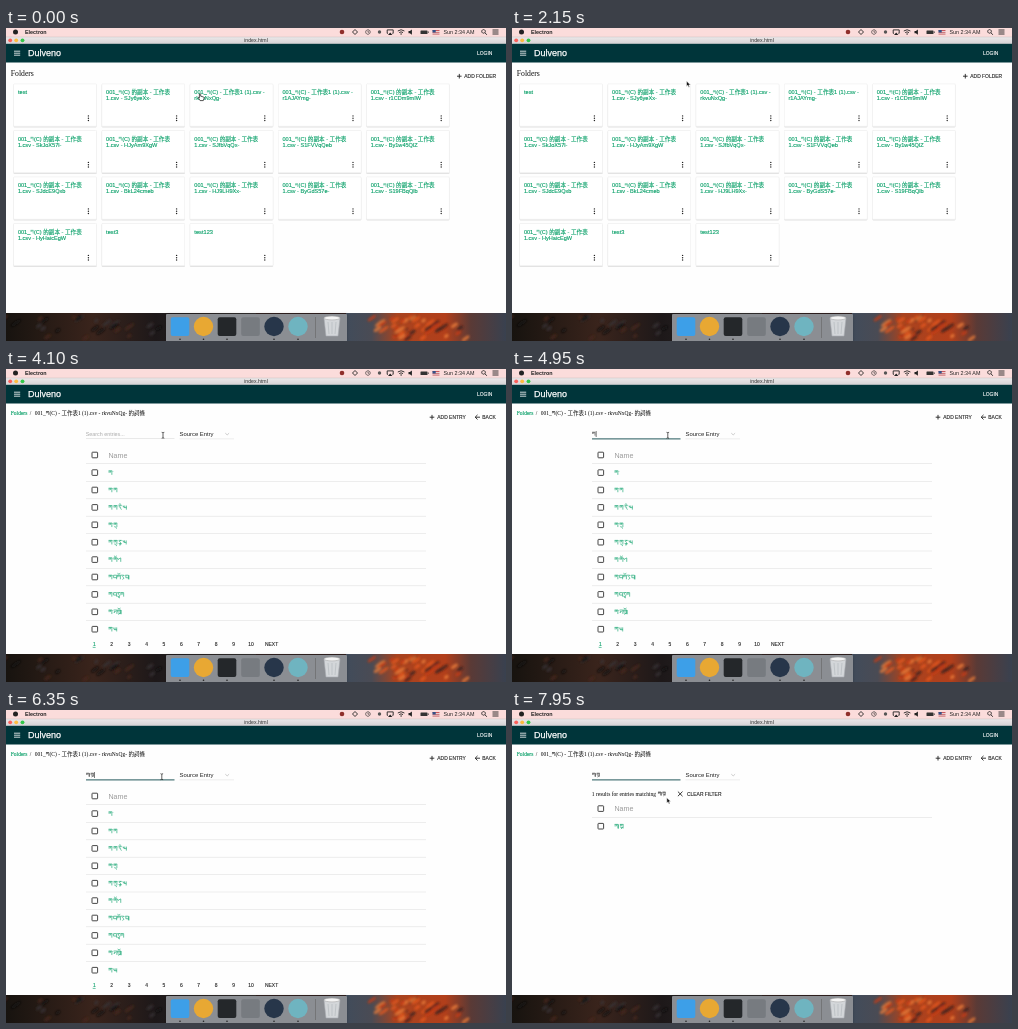
Write an HTML page that moves like this. It is 500 by 313 pixels and loops after 8 s.

```html
<!DOCTYPE html>
<html lang="en">
<head>
<meta charset="utf-8">
<title>Folders</title>
<style>
  html, body { margin: 0; width: 100%; height: 100%; overflow: hidden; }
  svg { display: block; width: 100vw; height: 100vh; }
  text { font-family: "Liberation Sans", "Noto Sans CJK SC", "Noto Sans CJK", sans-serif; white-space: pre; }
  .serif { font-family: "Liberation Serif", "Noto Sans CJK SC", "Noto Sans CJK", serif; }
  .button { font-size: 4.95px; fill: #222; stroke: #222; stroke-width: .12; }
  .green { color: #0aa069; }
  .green text, text.green { fill: currentColor; stroke: currentColor; stroke-width: .14; }
  .hover { color: #15302f; }
  .hover text { text-decoration: underline; }
  .line { fill: none; stroke: #222; stroke-width: .9; }
</style>
</head>
<body>
<svg id="stage" viewBox="0 0 500 313" preserveAspectRatio="none">
  <defs>
    <linearGradient id="leftSlope">
      <stop offset="0" stop-color="#17130f"/><stop offset=".35" stop-color="#3a241c"/>
      <stop offset=".6" stop-color="#1d1819"/><stop offset="1" stop-color="#33302f"/>
    </linearGradient>
    <linearGradient id="rightSlope">
      <stop offset="0" stop-color="#414c5b"/><stop offset=".16" stop-color="#4a4b54"/>
      <stop offset=".32" stop-color="#a8431f"/><stop offset=".62" stop-color="#b23f1b"/>
      <stop offset=".78" stop-color="#5a3a36"/><stop offset="1" stop-color="#39414f"/>
    </linearGradient>
    <linearGradient id="bar" x2="0" y2="1">
      <stop offset="0" stop-color="#ebe8e9"/><stop offset="1" stop-color="#d5d2d4"/>
    </linearGradient>
    <filter id="soft" x="-20%" y="-20%" width="140%" height="140%"><feGaussianBlur stdDeviation=".8"/></filter>
    <filter id="shadow" x="-5%" y="-10%" width="110%" height="125%">
      <feDropShadow dx="0" dy=".5" stdDeviation=".6" flood-opacity=".25"/>
    </filter>
    <filter id="dockShadow" x="-5%" y="-30%" width="110%" height="160%">
      <feDropShadow dx="0" dy="0" stdDeviation="1.5" flood-opacity=".2"/>
    </filter>
  </defs>
  <g id="desktop"></g>
  <g id="chrome"></g>
  <g id="folders"></g>
  <g id="entries"></g>
  <g id="cursor"></g>
</svg>
<script>
const byId = id => document.getElementById(id);
const range = n => [...Array(n).keys()];
const rect = (x, y, w, h, fill, extra = '') =>
  `<rect x="${x}" y="${y}" width="${w}" height="${h}" fill="${fill}" ${extra}/>`;
const dot = (x, y, r, fill) => `<circle cx="${x}" cy="${y}" r="${r}" fill="${fill}"/>`;
const line = (d, extra = '') => `<path class="line" d="${d}" ${extra}/>`;
const text = (x, y, size, content, extra = '') =>
  `<text x="${x}" y="${y}" font-size="${size}" ${extra}>${content}</text>`;
const button = (x, y, label, extra = '') => `<text class="button" x="${x}" y="${y}" ${extra}>${label}</text>`;
const plus = x => line(`M${x - 2.3} 48.2h4.6m-2.3 -2.3v4.6`);

// Strokes of the Tibetan letters: [path, advance]. Vowel signs attach to the letter before.
const letters = {
  k: ['M0 0H4M.6 0V2.4M2.1 0V2.1M3.7 0V4.6', 4.4],
  '.': ['M0 .2l.5 .6', 1.3],
  n: ['M0 0H3.4M.4 1.9Q2 .4 2.1 2T3.2 4.6', 4],
  y: ['M0 0Q0 2.6 1.6 2.3V0M1.6 2.3H3.5M3.5 0V4.6', 4.1],
  b: ['M0 0V2.8H3.4M0 0H3.4V4.6', 4],
  l: ['M0 .2Q.6 3 1.9 1.3T3.7 .2V4.6', 4.3],
  d: ['M0 0H3Q.8 1.2 2.6 2.4T1.6 4.8', 3.6],
  m: ['M0 0H3.5V4.6M.6 0V2.8L3.5 3', 4.1],
  t: ['M0 0H3.4M2.6 0Q-.3 1.4 2 2.3T1.6 5.8', 3.8],
  g: ['M0 0H3.6V4.6M.5 0V2.8M1.9 0V2.4', 4.2],
  s: ['M0 0H3.7V4.4M.4 3Q.6 1 2 1.5L.8 3.2', 4.2],
  h: ['M0 .2Q.2 3 1.6 2.8L3.5 2.4M1.7 0V2.8M3.5 0V4.6', 4.1],
  '|': ['M0 0V4.8', 1.6],
  i: ['M-4 -1q1.5 -2.2 3 0', 0],
  o: ['M-4 -2.2l1.6 1 1.6 -1', 0],
  u: ['M-3.6 4.3q1.2 -1 1.6 .5t1.4 1.2', 0],
  r: ['M-3.8 3.5h2.6l-2 1.7', 0]
};
const tibetanWidth = (word, scale) => [...word].reduce((sum, c) => sum + letters[c][1] * scale, 0);
function tibetan(word, x, top, scale, color = 'currentColor') {
  let pen = 0;
  const paths = [...word].map(c => {
    const [d, advance] = letters[c], path = `<path d="${d}" transform="translate(${pen})"/>`;
    pen += advance;
    return path;
  });
  return `<g transform="translate(${x} ${top}) scale(${scale})" fill="none" stroke="${color}" stroke-width=".7">${paths.join('')}</g>`;
}

const dockIcons = [['square', 174, '#3d9fe8'], ['circle', 197.5, '#e8a833'], ['square', 221, '#24272a'],
  ['square', 244.5, '#777b80'], ['circle', 268, '#27364a'], ['circle', 292, '#6fb4c0']];

const noise = n => Math.abs(Math.sin(n * 127.1) * 43758.5) % 1;
const patches = (count, x, width, colors) => range(count).map(i =>
  `<ellipse cx="${x + width * noise(i + 1)}" cy="${286 + 27 * noise(i + 50)}" rx="${2 + 5 * noise(i + 90)}" ry="1.8" transform="rotate(-35 ${x + width * noise(i + 1)} 299)" fill="${colors[i % colors.length]}" opacity=".7"/>`).join('');

byId('desktop').innerHTML =
  rect(0, 280, 250, 33, 'url(#leftSlope)') + rect(250, 280, 90, 33, '#30201f') + rect(340, 280, 160, 33, 'url(#rightSlope)') +
  `<g filter="url(#soft)">${patches(24, 0, 155, ['#0d0c0c', '#4a2a1e', '#393536'])}` +
  `${patches(40, 370, 85, ['#e8581c', '#35201d', '#c93a14', '#f0803a'])}</g>`;

byId('chrome').innerHTML =
  rect(0, 0, 500, 9, '#fbdcdb') + dot(9.5, 4, 2.5, '#222') +
  text(19, 6.2, 5.4, 'Electron', 'font-weight="700" fill="#222"') +
  dot(336, 4, 2.3, '#8f2f2b') + line('M349 1.5l2.5 2.5 -2.5 2.5 -2.5 -2.5z') +
  line('M362 1.7a2.3 2.3 0 1 1 -.1 0M362 2.5v1.7h1.2', 'style="stroke-width:.6"') + dot(373.5, 4, 1.7, '#555') +
  line('M382 5.3h-.8v-3.4h6v3.4h-.8') + '<path d="M382 7l2.2 -2.5 2.2 2.5z" fill="#222"/>' +
  line('M391.8 3q3.3 -2.5 6.6 0M393.2 4.6q1.9 -1.5 3.8 0') + dot(395.1, 6, .7, '#222') +
  '<path d="M402.5 3h1.4l2 -1.6v5.4l-2 -1.6h-1.4z" fill="#222"/>' +
  rect(414.5, 2.4, 7, 3.6, '#333', 'rx=".5"') + rect(421.9, 3.4, .7, 1.6, '#333') +
  rect(426.5, 2, 7, 4.6, '#f2f2f2') + range(3).map(i => rect(426.5, 2 + i * 1.8, 7, .9, '#c4464c')).join('') + rect(426.5, 2, 3.2, 2.5, '#345187') +
  text(437.5, 6.2, 5.4, 'Sun 2:34 AM', 'fill="#222"') +
  line('M477.6 1.6a1.8 1.8 0 1 1 -.1 0M479 4.8l1.8 2') + line('M486.5 2h6m-6 2h6m-6 2h6') +
  rect(0, 9, 500, 7, 'url(#bar)') + rect(0, 8.8, 500, .4, '#bbb') +
  dot(4.2, 12.3, 1.9, '#fc605b') + dot(10.2, 12.3, 1.9, '#fdbc40') + dot(16.5, 12.3, 1.9, '#34c84a') +
  text(250, 14.2, 5.2, 'index.html', 'text-anchor="middle" fill="#333"') +
  rect(0, 16, 500, 269, '#fefefe') + rect(0, 15.8, 500, 18.7, '#00353a') +
  line('M8 23.2h6.2m-6.2 2h6.2m-6.2 2h6.2', 'style="stroke:#fff;stroke-width:.8"') +
  text(22, 28.2, 9, 'Dulveno', 'fill="#fff" stroke="#fff" stroke-width=".25"') +
  button(471, 27.1, 'LOGIN', 'style="fill:#fff;stroke:#fff"') +
  rect(160, 286, 181, 30, '#8b8e93', 'rx="1" filter="url(#dockShadow)"') +
  dockIcons.map(([shape, x, fill]) => shape === 'circle' ? dot(x, 298.5, 9.7, fill) : rect(x - 9.3, 289.3, 18.6, 18.6, fill, 'rx="2"')).join('') +
  [174, 197.5, 221, 268, 292].map(x => dot(x, 311.3, .8, '#222')).join('') +
  rect(309.3, 289, .6, 21, '#666') +
  '<path d="M318 290h16l-2 18h-12z" fill="#d3d6d9" stroke="#a9aeb3" stroke-width=".6"/>' +
  '<ellipse cx="326" cy="290" rx="8" ry="1.9" fill="#f4f4f4" stroke="#aaa" stroke-width=".6"/>' +
  line('M322 294l1 12m3 -12v12m4 -12l-1 12', 'style="stroke:#b5babf;stroke-width:.7"');

const copy = id => ['(C) 的副本 - 工作表', '1.csv - ' + id];
const sheet = id => ['(C) - 工作表1 (1).csv -', id];
const cards = ['test', copy('SJy6yeXx-'), sheet('rkvuNxQg-'), sheet('r1AJAYmg-'), copy('r1CDm9mIW'),
  ...['SkJoX57l-', 'HJyAm9XgW', 'SJfbVqQx-', 'S1FVVqQeb', 'By1w45QlZ',
    'SJdcE9Qxb', 'BkL24cmeb', 'HJ9LH9Xx-', 'ByGdS57e-', 'S19FBqQlb', 'HyHaicEgW'].map(copy),
  'test3', 'test123'];

function card(label, i) {
  const x = 7.6 + i % 5 * 88.2, y = 56 + Math.floor(i / 5) * 46.5;
  const words = typeof label === 'string'
    ? text(x + 4.3, y + 10.3, 5.7, label)
    : text(x + 4.3, y + 10.3, 5.6, `001_<tspan dx="3.6">${label[0]}</tspan>`) +
      tibetan('k', x + 17, y + 6.8, .7) + text(x + 4.3, y + 16, 5.6, label[1]);
  return rect(x, y, 83, 42.2, '#fff', 'rx=".8" stroke="#ebebeb" stroke-width=".4" filter="url(#shadow)"') +
    `<g class="green" id="card${i}">${words}</g>` +
    [-2.3, 0, 2.3].map(dy => dot(x + 74.8, y + 34.2 + dy, .7, '#222')).join('');
}
byId('folders').innerHTML =
  text(4.8, 48.2, 7.7, 'Folders', 'class="serif" fill="#111"') + plus(453.3) + button(458.3, 50, 'ADD FOLDER') +
  cards.map(card).join('');

const checkbox = y => rect(86, y - 2.8, 5.6, 5.6, 'none', 'rx=".6" stroke="#333" stroke-width=".9"');
const divider = (y, x = 80, w = 340) => rect(x, y, w, .6, '#e2e2e2');
const words = ['k.', 'k.k', 'k.k.ni.y', 'k.ku', 'k.ku.tr.y', 'k.kol', 'k.bkod.m|', 'k.btug', 'k.skro|', 'k.h'];
const query = 'k|kr';

function table(top, rows) {
  return checkbox(top) + text(102.5, top + 2.5, 7.1, 'Name', 'fill="#999"') + divider(top + 8.4) +
    rows.map((word, i) => {
      const y = top + 17.6 + i * 17.4;
      return checkbox(y) + `<g class="green">${tibetan(word, 102.6, y - 1.8, .88)}</g>` +
        (i < rows.length - 1 ? divider(y + 8.5) : '');
    }).join('');
}
const pages = range(10).map(i =>
  button(88.3 + i * 17.4, 277, i + 1, 'text-anchor="middle"' + (i ? '' : ' style="fill:#0aa069;stroke:#0aa069;text-decoration:underline"'))).join('');

byId('entries').innerHTML =
  text(4.8, 46, 5.5, 'Folders', 'class="serif green"') + text(23.7, 46, 5.5, '/', 'class="serif"') +
  text(28.7, 46, 5.5, '001_<tspan dx="3.8">(C) - 工作表1 (1).csv - rkvuNxQg- 的詞條</tspan>', 'class="serif"') +
  tibetan('k', 40, 42.5, .75, '#111') +
  plus(426) + button(431.3, 50, 'ADD ENTRY') + line('M474 48.2h-4.8m2.3 -2.3l-2.3 2.3 2.3 2.3') + button(476.3, 50, 'BACK') +
  text(79.8, 66.8, 5.35, 'Search entries...', 'id="placeholder" fill="#aaa"') +
  '<g id="typed"></g>' + rect(80, 69.4, 88.5, .6, '#ddd', 'id="underline"') +
  text(173.5, 66.8, 5.9, 'Source Entry', 'fill="#222"') + divider(69.6, 173.5, 54.5) +
  line('M219.3 64.2l1.9 1.7 1.9 -1.7', 'style="stroke:#aaa;stroke-width:.6"') +
  `<g id="all">${table(86, words)}${pages}${button(259, 277, 'NEXT')}</g>` +
  `<g id="filtered">${text(79.8, 85.5, 5.5, '1 results for entries matching', 'class="serif"')}` +
  tibetan(query, 146, 82, .75, '#111') + line('M165.9 81.6l4.6 4.6m0 -4.6l-4.6 4.6') + button(175, 86, 'CLEAR FILTER') +
  table(98.6, [query]) + '</g>';

const shapes = {
  arrow: '<path d="M0 0V5.4L1.3 4.2 2.2 6.3 3.2 5.9 2.3 3.9H4z" fill="#111" stroke="#fff" stroke-width=".5"/>',
  hand: '<path d="M-.6 0Q.3 -.7 .7 .2V2.2L3.7 3Q4.3 3.3 4 4.5L3.3 6.6H.1L-1.8 3.7Q-1.4 3 -.6 3.8z" fill="#fff" stroke="#111" stroke-width=".7"/>',
  beam: line('M-1.3 -3q1.3 0 1.3 .8v4.4q0 .8 -1.3 .8M1.3 -3q-1.3 0 -1.3 .8M1.3 3q-1.3 0 -1.3 -.8', 'style="stroke-width:.7"')
};

// [time, x, y]
const pointerPath = [[0, 194, 66], [400, 194, 66], [950, 174.5, 53], [2350, 174.5, 53], [2850, 194, 65],
  [3500, 194, 65], [4000, 157, 66.3], [4600, 157, 66.3], [4800, 155.8, 66.3], [7100, 155.8, 66.8], [7600, 154.8, 87.7], [8000, 154.8, 87.7]];
// [time, content of the search field]
const typing = [[0, ''], [4900, 'k'], [5100, 'k.'], [5350, 'k.k'], [5600, 'k.ku'], [6000, 'k'], [6100, 'k|'], [6200, 'k|k'], [6300, query]];
const DURATION = 8000, OPEN = 3550, FOCUS = 4600, FILTER = 6600;

function pointerAt(t) {
  const next = Math.max(1, pointerPath.findIndex(p => p[0] > t));
  const [t0, x0, y0] = pointerPath[next - 1], [t1, x1, y1] = pointerPath[next];
  const u = (t - t0) / (t1 - t0), ease = u * u * (3 - 2 * u);
  return [x0 + (x1 - x0) * ease, y0 + (y1 - y0) * ease];
}
function pointerShape(t, y) {
  if (t < OPEN) return y > 61 ? 'hand' : 'arrow';
  return y > 60 && y < 72 && t > 3800 ? 'beam' : 'arrow';
}
const show = (id, visible) => byId(id).style.display = visible ? '' : 'none';

function render(t) {
  const [x, y] = pointerAt(t);
  byId('cursor').setAttribute('transform', `translate(${x} ${y})`);
  byId('cursor').innerHTML = shapes[pointerShape(t, y)];
  byId('card2').classList.toggle('hover', t > 2650 && t < OPEN);

  show('folders', t < OPEN);
  show('entries', t >= OPEN);
  show('all', t < FILTER);
  show('filtered', t >= FILTER);

  const [typedAt, word] = typing.filter(step => step[0] <= t).pop();
  const focused = t >= FOCUS;
  const caretOn = focused && (t - Math.max(typedAt, FOCUS)) % 1000 < 500;
  const caretX = 80.5 + tibetanWidth(word, .75);
  byId('typed').innerHTML = tibetan(word, 80.2, 63.2, .75, '#222') + (caretOn ? rect(caretX, 62, .6, 6, '#222') : '');
  show('placeholder', !word);
  byId('underline').setAttribute('fill', focused ? '#23595b' : '#ddd');
  byId('underline').setAttribute('height', focused ? 1 : .6);
}

const start = performance.now();
function tick() {
  render((performance.now() - start) % DURATION);
  requestAnimationFrame(tick);
}
tick();
</script>
</body>
</html>
```
